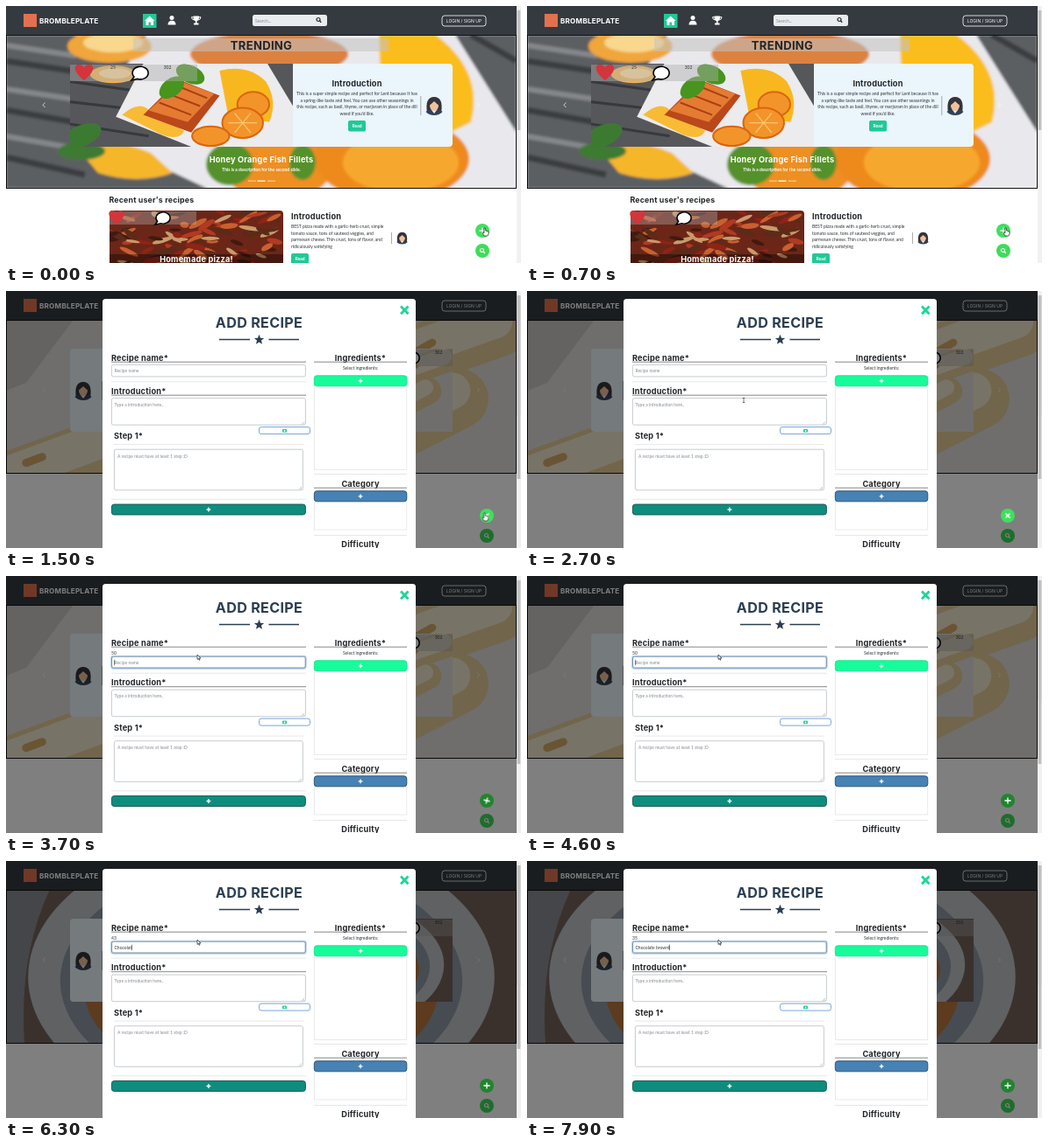
Animation of 587x294 px, one loop 8000 ms. Source, as an HTML page:

```html
<!DOCTYPE html>
<html lang="en">
<head>
<meta charset="utf-8">
<title>Add recipe</title>
<style>
html, body { margin: 0; width: 100%; height: 100%; overflow: hidden; background: #fff; }
svg#stage { display: block; width: 587px; height: 294px; }
text { font: 5px Lato, sans-serif; fill: #2f3336; dominant-baseline: central; white-space: pre; }
.head { font: 700 9.2px Inter, sans-serif; letter-spacing: .02em; fill: #212529; }
.brand { font-size: 8.2px; fill: #fff; }
.recent { font-size: 8.8px; }
.trend { font-size: 13.1px; }
.title { font-size: 16.1px; fill: #2c3e50; }
.white { fill: #fff; }
.bold { font-weight: 700; }
.login { font: 5px Inter, sans-serif; fill: #fff; }
.hint { fill: #858b91; }
.mid { text-anchor: middle; }

.anim { animation-duration: 8s; animation-iteration-count: infinite; }
#track { animation-name: slide; animation-timing-function: ease-in-out; }
#dim { animation-name: dim; animation-timing-function: linear; }
#modal { animation-name: fade; animation-timing-function: linear; }
#drop { animation-name: drop; animation-timing-function: ease-out; }
.nudge { animation-name: nudge; animation-timing-function: step-end; }
#fab { animation-name: fab; animation-timing-function: linear; }
#plus { animation-name: spin; animation-timing-function: ease; }
.shift { animation-name: shift; animation-timing-function: step-end; }
.focus { animation-name: focus; animation-timing-function: step-end; }
#mouse { animation-name: mouse; animation-timing-function: ease-in-out; }
#hand { animation-name: hand; animation-timing-function: step-end; }
#beam { animation-name: beam; animation-timing-function: step-end; }
#arrow { animation-name: arrow; animation-timing-function: step-end; }
#longThumb { animation-name: thumb; animation-timing-function: step-end; }

@keyframes slide {
  0%, 8.95% { transform: translateX(0); }
  16.45%, 71% { transform: translateX(-582px); }
  78.5%, 100% { transform: translateX(-1164px); }
}
@keyframes dim { 0%, 12.5% { opacity: 0; } 14%, 100% { opacity: .5; } }
@keyframes fade { 0%, 13.3% { opacity: 0; } 15.1%, 100% { opacity: 1; } }
@keyframes drop { 0%, 13% { transform: translateY(-21.5px); } 16.75%, 100% { transform: none; } }
@keyframes nudge { 0% { transform: none; } 13%, 100% { transform: translateX(5px); } }
@keyframes fab { 0%, 45% { fill: #3fdf5f; } 46.25%, 100% { fill: #22842f; } }
@keyframes spin {
  0%, 12.5% { transform: rotate(0); }
  16%, 45% { transform: rotate(45deg); }
  48%, 100% { transform: rotate(0); }
}
@keyframes shift { 0% { transform: none; } 45%, 100% { transform: translateY(7.5px); } }
@keyframes focus { 0% { opacity: 0; } 45%, 100% { opacity: 1; } }
@keyframes mouse {
  0%, 18.5% { transform: translate(545px, 254px); }
  31%, 35% { transform: translate(247px, 125px); }
  43.5%, 100% { transform: translate(218px, 90px); }
}
@keyframes hand { 0% { opacity: 1; } 19.5%, 100% { opacity: 0; } }
@keyframes beam { 0% { opacity: 0; } 30% { opacity: 1; } 36.5%, 100% { opacity: 0; } }
@keyframes arrow { 0% { opacity: 0; } 19.5% { opacity: 1; } 30% { opacity: 0; } 36.5%, 100% { opacity: 1; } }
@keyframes thumb { 0% { opacity: 0; } 13%, 100% { opacity: 1; } }
</style>
</head>
<body>
<svg id="stage" viewBox="0 0 587 294">
  <defs>
    <clipPath id="carouselClip"><rect y="33" width="582" height="176"/></clipPath>
    <clipPath id="pizzaClip"><rect x="118" y="234" width="198" height="70" rx="4"/></clipPath>
    <filter id="soft" x="0" y="0" width="1" height="1"><feGaussianBlur stdDeviation="1.6"/></filter>
    <symbol id="fish" viewBox="0 0 254 94" preserveAspectRatio="xMidYMid slice">
      <rect width="254" height="94" fill="#55575b"/>
      <path d="M0 20L70 30M0 43L60 50M0 68L90 82" stroke="#37393d" stroke-width="3"/>
      <ellipse cx="50" cy="12" rx="26" ry="10" fill="#f3b04a"/>
      <ellipse cx="52" cy="11" rx="18" ry="6" fill="#f8d491"/>
      <path d="M84 0H224L254 50V94H138L53 60Z" fill="#ecebee"/>
      <path d="M60 58Q80 40 92 54L130 76Q125 88 104 80Z" fill="#f8bb35"/>
      <path d="M170 8Q202 0 222 20Q236 42 226 66L180 60Z" fill="#f9b71f"/>
      <g stroke="#d9660e" stroke-width="2" fill="#f3942a">
        <ellipse cx="208" cy="46" rx="18" ry="14"/><ellipse cx="196" cy="67" rx="23" ry="17"/><ellipse cx="160" cy="82" rx="21" ry="11"/>
      </g>
      <path d="M180 67H212M187 56L205 78M205 56L187 78" stroke="#fbc56c" stroke-width="1.300"/>
      <path d="M84 58L124 18L170 36L138 78Z" fill="#b9481a"/>
      <path d="M90 53L126 20L164 34L134 66Z" fill="#e57b33"/>
      <path d="M102 44L138 58M112 34L148 48M122 25L156 39" stroke="#a8400f" stroke-width="2"/>
      <g fill="#47941f">
        <ellipse cx="116" cy="27" rx="16" ry="10" transform="rotate(-38 116 27)"/>
        <ellipse cx="137" cy="12" rx="17" ry="10" transform="rotate(25 137 12)"/>
        <ellipse cx="14" cy="82" rx="24" ry="12" fill="#3c7a31" transform="rotate(-24 14 82)"/>
      </g>
    </symbol>
    <symbol id="fishWide" viewBox="0 0 582 176">
      <g filter="url(#soft)">
        <rect width="582" height="176" fill="#5c5e62"/>
        <path d="M0 30L80 42M0 86L90 102M0 140L90 160M530 0L582 30" stroke="#3b3d41" stroke-width="7"/>
        <path d="M0 12L80 24M0 62L80 74M0 116L80 130" stroke="#85878b" stroke-width="6"/>
        <path d="M160 0H512L582 112V176H230L90 110Z" fill="#e9e8ec"/>
        <ellipse cx="118" cy="13" rx="48" ry="19" fill="#f0a63a"/>
        <ellipse cx="122" cy="9" rx="34" ry="11" fill="#f9d78f"/>
        <ellipse cx="300" cy="22" rx="90" ry="26" fill="#dc8240"/>
        <path d="M80 128Q120 115 165 135L190 158Q150 172 105 158Z" fill="#f6b62a"/>
        <ellipse cx="86" cy="133" rx="27" ry="10" fill="#3c7a31"/>
        <path d="M425 0H490Q545 42 530 100L430 150Z" fill="#fbbd1e"/>
        <ellipse cx="310" cy="150" rx="62" ry="40" fill="#ee8f22"/>
        <ellipse cx="440" cy="142" rx="88" ry="48" fill="#ee8a1b"/>
        <ellipse cx="450" cy="146" rx="66" ry="34" fill="#f6a82e"/>
        <ellipse cx="255" cy="148" rx="27" ry="24" fill="#55912a"/>
        <ellipse cx="338" cy="146" rx="15" ry="20" fill="#55912a"/>
      </g>
    </symbol>
    <symbol id="pasta" viewBox="0 0 254 94" preserveAspectRatio="xMidYMid slice">
      <rect width="254" height="94" fill="#e0deda"/>
      <path d="M0 0H40L10 40 0 44Z" fill="#c9c8c6"/>
      <g fill="none" stroke-linecap="round">
        <path d="M-5 92L60 68M70 92L150 38M120 102L225 48M165 40L245 12" stroke="#e4cb98" stroke-width="30"/>
        <path d="M-5 88L60 64M72 86L150 34M122 96L222 44M167 36L243 9" stroke="#f2e8d0" stroke-width="18"/>
        <path d="M90 78L98 72M128 46L133 43M160 80L168 74M200 52L206 48M205 24L212 20M10 80L18 77" stroke="#d3ab68" stroke-width="4"/>
      </g>
    </symbol>
    <symbol id="bowl" viewBox="0 0 254 94" preserveAspectRatio="xMidYMid slice">
      <rect width="254" height="94" fill="#74625a"/>
      <path d="M0 0H26Q4 40 10 94H0Z" fill="#8b8e94"/>
      <ellipse cx="127" cy="52" rx="116" ry="72" fill="#bfc3c8"/>
      <ellipse cx="127" cy="54" rx="100" ry="60" fill="#8d99a5"/>
      <ellipse cx="127" cy="58" rx="88" ry="50" fill="#b9773f"/>
      <ellipse cx="150" cy="52" rx="52" ry="32" fill="#d8bd97"/>
    </symbol>
    <symbol id="pizza" viewBox="0 0 198 64" preserveAspectRatio="xMidYMid slice">
      <rect width="198" height="64" fill="#6b2618"/>
      <g id="toppings"></g>
    </symbol>
    <g id="heart"><path d="M0 9C-13-1-12-9-6-9Q-1-9 0-5Q1-9 6-9C12-9 13-1 0 9Z" fill="#d5343a"/></g>
    <g id="bubble"><path d="M-6 5L-9 9L-2 7.4A9 7.3 0 1 0-6 5Z" fill="#fff" stroke="#000" stroke-width="1.6"/></g>
    <g id="avatar">
      <path d="M-8 7C-10-5-7-11 0-11S10-5 8 7Z" fill="#34343a"/>
      <path d="M-9.500 6Q-7 3 0 3T9.500 6Q6 10 0 10T-9.500 6Z" fill="#30425a"/>
      <path d="M-3 4L0 8L3 4Z" fill="#efeff0"/>
      <ellipse cy="-1" rx="5" ry="6" fill="#f0c19a"/>
      <path d="M-6-1Q-5-8 0-8T6-1Q3-3 0-6Q-3-3-6-1Z" fill="#34343a"/>
    </g>
    <g id="lens"><circle r="2" fill="none" stroke-width="1.2"/><path d="M1.500 1.500L3.200 3.200" stroke-width="1.400"/></g>
  </defs>
</svg>
<script>
const text = (x, y, str, cls = '') => `<text x="${x}" y="${y}" class="${cls}">${str}</text>`;
const rect = (x, y, w, h, fill, more = '') => `<rect x="${x}" y="${y}" width="${w}" height="${h}" fill="${fill}" ${more}/>`;
const at = (x, y, body, scale = 1) => `<g transform="translate(${x} ${y}) scale(${scale})">${body}</g>`;
const use = (id, x, y, scale) => at(x, y, `<use href="#${id}"/>`, scale);
const photo = (id, x, y, w, h) => `<use href="#${id}" x="${x}" y="${y}" width="${w}" height="${h}"/>`;
const line = (x1, x2, y, color, w = .7) => `<path d="M${x1} ${y}H${x2}" stroke="${color}" stroke-width="${w}"/>`;
const plus = (x, y, r = 2.4) => `<path d="M${x - r} ${y}h${2 * r}M${x} ${y - r}v${2 * r}" stroke="#fff" stroke-width="1.3"/>`;
const lines = (x, y, rows, cls) => rows.map((row, i) => text(x, y + i * 7.5, row, cls)).join('');
const readButton = (x, y) => rect(x, y, 20, 12.5, '#20c997', 'rx="2"') + text(x + 10, y + 6.3, 'Read', 'mid white bold');
const box = (x, y, w, h, stroke = '#b9bec3') => rect(x, y, w, h, '#fff', `rx="2" stroke="${stroke}" stroke-width=".8"`);

function slide(index, image, backdrop, flipped, rows, title, subtitle) {
  const px = flipped ? 255 : 73, cx = flipped ? 182 : 400, stats = flipped ? 382 : 73;
  return at(index * 582, 0,
    photo(backdrop, 0, 33, 582, 176) +
    rect(73, 66, 436, 95, '#ebf5fc', 'rx="4"') +
    photo(image, px, 66, 254, 95) +
    rect(stats, 67, flipped ? 127 : 145, 19, '#aaa', 'opacity=".45"') +
    use('heart', stats + 16, 76) + use('bubble', stats + 79, 76) +
    text(stats + 49, 70, '25', 'mid') + text(stats + 111, 70, '302', 'mid') +
    text(cx, 88.5, 'Introduction', 'head mid') + lines(cx, 100, rows, 'mid') +
    readButton(cx - 10, 131) +
    rect(flipped ? 109 : 472.5, 103, .7, 22, '#888') +
    use('avatar', flipped ? 88 : 488, 115) +
    text(291, 175, title, 'head white mid') + text(291, 186.5, subtitle, 'mid white bold') +
    rect(.5, 33.5, 581, 175, 'none', 'stroke="#111"'));
}

const fishRows = ['This is a super simple recipe and perfect for Lent because it has',
  'a spring-like taste and feel. You can use other seasonings in',
  'this recipe, such as basil, thyme, or marjoram in place of the dill', "weed if you'd like."];
const pastaRows = ['Thanksgiving is a week away. Do you know what that means?',
  'Lots of delicious food, yes? Cannelloni pasta stuffed with a',
  'cheese and savory Ricotta, covered in homemade marinara', 'sauce and baked with parmesan until crispy.'];

const navbar = rect(0, 0, 582, 33, '#343a40') +
  rect(20, 9, 15, 15, '#e2714f') + text(38, 17, 'BROMBLEPLATE', 'head brand') +
  rect(156, 9, 15.5, 16, '#20c997') +
  `<g fill="#fff"><path d="M158 17L163.700 11.500L169.500 17H168V22H165V18.500H162.500V22H159.500V17Z"/>
   <circle cx="189" cy="13.500" r="2.500"/><path d="M184.500 21.500Q184.500 16.700 189 16.700T193.500 21.500Z"/>
   <path d="M213.500 11.500H220V14Q219.500 17 217.500 17.500V19.500H219.500V21.500H214V19.500H216V17.500Q214 17 213.500 14Z"/></g>
   <path d="M213.500 12.700H211.500Q211.500 15.500 214.500 16M220 12.700H222Q222 15.500 219 16" fill="none" stroke="#fff"/>` +
  rect(281, 10, 85, 13, '#e9ecef', 'rx="2.500"') + text(284, 16.5, 'Search...', 'hint') +
  `<g stroke="#222">${use('lens', 356, 15.5)}</g>` +
  rect(497, 11, 50, 12, 'none', 'rx="3" stroke="#fff" stroke-width=".8"') + text(522, 17, 'LOGIN / SIGN UP', 'login mid');

const carousel = `<g clip-path="url(#carouselClip)"><g id="track" class="anim">` +
  slide(0, 'fish', 'fishWide', false, fishRows, 'Honey Orange Fish Fillets', 'This is a description for the second slide.') +
  slide(1, 'pasta', 'pasta', true, pastaRows, 'Delicious Cannelloni', 'This is a description for the third slide.') +
  slide(2, 'bowl', 'bowl', true, pastaRows, 'Creamy Soup', 'This is a description for the first slide.') + '</g>' +
  rect(145, 37, 291, 15, '#c4c4c4', 'opacity=".55"') + text(291, 45, 'TRENDING', 'head trend mid') +
  `<path d="M44.500 110.500L42 113.300L44.500 116M537 110.500L539.500 113.300L537 116" fill="none" stroke="#fff" opacity=".7"/>` +
  [276, 286.5, 298].map((x, i) => rect(x, 199.5, 9, 1.3, '#fff', `opacity="${i === 1 ? 1 : .5}"`)).join('') + '</g>';

const recent = text(117.5, 221.5, "Recent user's recipes", 'head recent') +
  `<g clip-path="url(#pizzaClip)">` + photo('pizza', 118, 234, 198, 64) +
  rect(118, 235, 99, 15, '#aaa', 'opacity=".4"') + rect(118, 284, 198, 10, '#000', 'opacity=".35"') + '</g>' +
  use('heart', 126, 242, .85) + use('bubble', 178, 242, .9) +
  text(217, 289.5, 'Homemade pizza!', 'head white mid') +
  text(325, 240.5, 'Introduction', 'head') +
  lines(325, 252, ['BEST pizza made with a garlic-herb crust, simple', 'tomato sauce, tons of sauteed veggies, and',
    'parmesan cheese. Thin crust, tons of flavor, and', 'ridiculously satisfying']) +
  rect(439, 259, .7, 13, '#888') + use('avatar', 451.5, 266, .66) + readButton(325, 283);

const searchFab = `<g class="anim nudge">${at(543, 280, '<circle r="8" fill="#3fdc5a"/>')}
  <g stroke="#fff">${use('lens', 542.5, 279.5)}</g></g>`;

const starPoints = Array.from({ length: 10 }, (_, i) => {
  const r = i % 2 ? 2.6 : 6, a = Math.PI * (i / 5 - .5);
  return [288.5 + r * Math.cos(a), 55.8 + r * Math.sin(a)].map(v => v.toFixed(2));
}).join(' ');

const grip = (x, y) => `<path d="M${x - 4} ${y}l3-3M${x - 2} ${y}l1-1" stroke="#888" stroke-width=".5"/>`;
const section = (x1, x2, y, label, mid) => text(mid ? 404 : x1, y, label, 'head ' + (mid ? 'mid' : '')) +
  line(x1, x2, y + 5.2, '#555');
const bar = (x, y, w, fill, edge) => rect(x, y, w, 12, fill, `rx="3" stroke="${edge}" stroke-width=".9"`) + plus(x + w / 2, y + 6);

const leftColumn = section(120, 342, 76, 'Recipe name*') +
  `<g class="anim focus">${text(120, 88, '<tspan id="count">50</tspan>')}</g>
  <g class="anim shift">` +
  box(120.4, 84.4, 221, 13.5) +
  `<g class="anim focus">${rect(119.8, 83.8, 222.2, 14.7, 'none', 'rx="2.500" stroke="#a9cdf2" stroke-width="1.200"')}
   ${rect(120.6, 84.6, 220.6, 13, 'none', 'rx="2" stroke="#52728f" stroke-width=".700"')}
   <rect id="caret" y="88.500" width=".600" height="6" fill="#111"/></g>` +
  `<text id="entry" x="123.500" y="91.400"></text>` +
  line(120, 342, 103.7, '#ddd') +
  section(120, 342, 114, 'Introduction*') + box(120.4, 122.6, 221, 30.6) +
  text(123.5, 129.5, 'Type a introduction here..', 'hint') + grip(341, 152.5) +
  rect(288.5, 155.6, 58, 8, '#fff', 'rx="2.500" stroke="#6c9bd0" stroke-width=".900"') +
  rect(315, 158, 5, 3.8, '#22cf91', 'rx=".800"') + '<circle cx="317.500" cy="160" r="1" fill="#fff"/>' +
  text(123, 165.5, 'Step 1*', 'head') + line(123, 339, 175.6, '#ddd') +
  box(123.4, 181.2, 215, 46.6) + text(127, 188.5, 'A recipe must have at least 1 step :D', 'hint') + grip(338, 227) +
  line(120, 342, 238.3, '#ddd') + bar(120.4, 244, 221, '#0e8d7e', '#14544d') + '</g>';

const rightColumn = section(351, 457, 76, 'Ingredients*', true) + text(404, 88, 'Select ingredients:', 'mid') +
  rect(351.3, 104, 105.5, 100.5, 'none', 'stroke="#ddd" stroke-width=".600"') + bar(351.3, 96.8, 105.5, '#17fb9b', '#12e48c') +
  line(351, 457, 209.5, '#ddd') + section(351, 457, 220, 'Category', true) +
  rect(351.3, 236, 105.5, 37, 'none', 'stroke="#ddd" stroke-width=".600"') + bar(351.3, 228.8, 105.5, '#4682b4', '#294d6c') +
  line(351, 457, 279.5, '#ddd') + text(404, 289.5, 'Difficulty', 'head mid');

const modal = `<g id="modal" class="anim"><g id="drop" class="anim">` +
  rect(110, 9, 357, 320, '#fff', 'rx="3.500"') +
  '<path d="M450 17.500L458.500 26.300M458.500 17.500L450 26.300" stroke="#1fd59b" stroke-width="2.800"/>' +
  text(288.5, 36, 'ADD RECIPE', 'head title mid') +
  line(243, 278, 55.5, '#2c3e50', 1.6) + line(299.5, 334, 55.5, '#2c3e50', 1.6) +
  `<polygon points="${starPoints}" fill="#2c3e50"/>` + leftColumn + rightColumn + '</g></g>';

const addFab = `<g class="anim nudge"><g transform="translate(543 257)">
  <circle id="fab" class="anim" r="8"/><g id="plus" class="anim">${plus(0, 0, 3.6)}</g></g></g>`;

const scrollbar = rect(582, 0, 5, 294, '#f1f1f1') + rect(582.7, 5, 3.6, 137, '#c1c1c1') +
  `<g id="longThumb" class="anim">${rect(582.7, 5, 3.6, 210, '#c1c1c1')}</g>`;

const pointer = `<g id="mouse" class="anim" stroke="#000" stroke-width=".600" fill="#fff">
  <path id="hand" class="anim" d="M0 0Q1-.800 1.600.200V3L5 4V7L4 9H0L-2 5.500Q-1.500 4.500 0 5.500Z"/>
  <path id="beam" class="anim" d="M-1.300-2.500H1.300M0-2.500V2.500M-1.300 2.500H1.300" stroke="#222"/>
  <path id="arrow" class="anim" d="M0 0V5.500L1.300 4.300L2.200 6.300L3 5.900L2.200 4H4Z"/></g>`;

const stage = document.getElementById('stage');
stage.insertAdjacentHTML('beforeend', rect(0, 0, 587, 294, '#fff') + carousel + navbar + recent + searchFab +
  `<rect id="dim" class="anim" width="587" height="294"/>` + modal + addFab + scrollbar + pointer);

// Scattered pizza toppings from a small seeded generator.
let seed = 11;
const random = () => (seed = seed * 16807 % 2147483647) / 2147483647;
const toppingColors = ['#b03a22', '#c99a6a', '#8e2416', '#3f1a10', '#c8602f', '#5a2b18'];
document.getElementById('toppings').innerHTML = Array.from({ length: 90 }, (_, i) => {
  const x = random() * 198, y = random() * 64, turn = random() * 70 - 35;
  return `<ellipse rx="${5 + random() * 8}" ry="${1.5 + random() * 2}" fill="${toppingColors[i % 6]}" transform="translate(${x} ${y}) rotate(${turn})"/>`;
}).join('');

const phrase = 'Chocolate browni';
const entry = document.getElementById('entry');
const caret = document.getElementById('caret');
const count = document.getElementById('count');
let shown = -1;

function tick() {
  const time = performance.now() % 8000;
  const typed = Math.min(phrase.length, Math.max(0, Math.floor((time - 4660) / 200)));
  if (typed !== shown) {
    shown = typed;
    entry.textContent = phrase.slice(0, typed) || 'Recipe name';
    entry.setAttribute('class', typed ? '' : 'hint');
    caret.setAttribute('x', 123.4 + (typed ? entry.getComputedTextLength() : 0));
    count.textContent = typed ? 51 - typed : 50;
  }
  requestAnimationFrame(tick);
}
tick();
</script>
</body>
</html>
```
